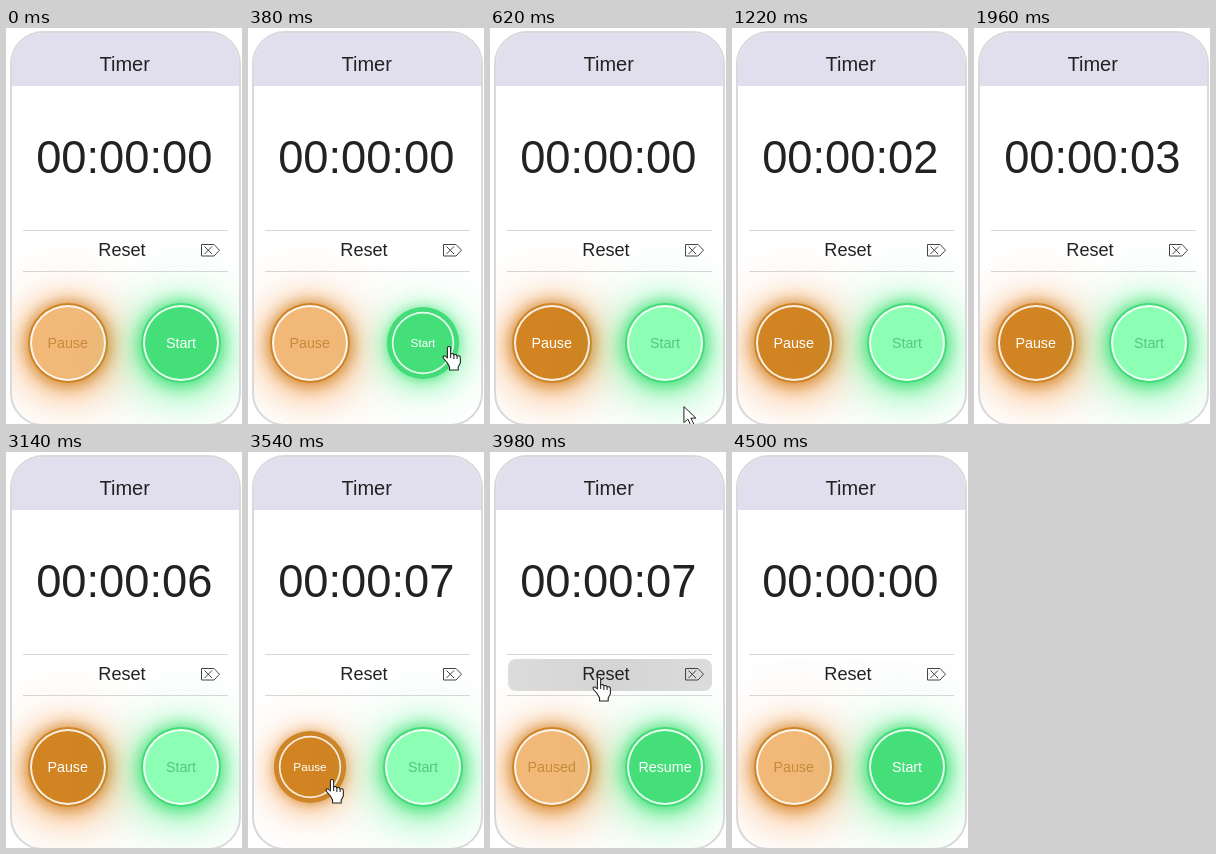
Recreate the animation shown at these times as an HTML page. Size 236 by 396 pixels, loop 4.52 s.

```html
<!DOCTYPE html>
<html lang="en">
<head>
<meta charset="utf-8">
<title>Timer</title>
<style>
  html, body { margin: 0; width: 100%; height: 100%; overflow: hidden; background: #fff; }
  body { position: relative; font-family: "Liberation Sans", Arial, sans-serif; color: #222; }
  .card, .card div, svg { position: absolute; box-sizing: border-box; }
  .card { left: 3.5px; top: 2.5px; width: 231px; height: 395px; border: 2px solid #d9d9dc; border-radius: 33px; }
  .clip { inset: 0; overflow: hidden; border-radius: 31px; }
  .stage { left: -5.5px; top: -4.5px; width: 236px; height: 400px; }
  .header { left: 0; top: 0; width: 236px; height: 58px; background: #e1deee; }
  .label { left: 0; width: 236px; text-align: center; white-space: nowrap; }
  .title { top: 24px; left: .7px; font-size: 20px; line-height: 24px; }
  .time { top: 104px; left: .3px; font-size: 45.3px; line-height: 52px; }
  .reset { top: 212px; left: -2px; font-size: 18.1px; line-height: 20px; }
  .rule { left: 17px; width: 205px; height: 1px; background: #d6d6d6; }
  .hover { left: 17.5px; top: 207px; width: 204.5px; height: 32px; border-radius: 8px;
    background: linear-gradient(90deg, #dcdcdc, #d4d4d4 50%, #dcdcdc); }
  .button { top: 277.3px; width: 76px; height: 76px; border: 2.5px solid #ffffffe0; border-radius: 50%;
    font-size: 14.3px; line-height: 72px; text-align: center; white-space: nowrap; }
  .button span { position: absolute; left: -10px; right: -10px; }
</style>
</head>
<body>
<div class="card"><div class="clip"><div class="stage">
  <div class="header"></div>
  <div class="label title">Timer</div>
  <div class="label time" id="time"></div>
  <div class="button" id="pause" style="left:23.7px"><span></span></div>
  <div class="button" id="start" style="left:137px"><span></span></div>
  <div class="hover" id="hover"></div>
  <div class="rule" style="top:202px"></div>
  <div class="rule" style="top:243px"></div>
  <div class="label reset">Reset</div>
  <svg style="left:194px;top:215px" width="22" height="15" fill="none" stroke="#444">
    <path d="M1.5 1.5H14L19.5 7.2L14 13H1.5ZM4.5 3.5L12 11M12 3.5L4.5 11"/>
  </svg>
</div></div></div>
<svg id="cursor" style="left:0;top:0" width="22" height="28" fill="#fff" stroke="#222" stroke-linejoin="round">
  <path id="arrow" d="M1 1V17L5 13.5L8 20L11 18.7L8 12.5H13Z"/>
  <path id="hand" transform="scale(1.08 1)" d="M5 17L1.5 12.5Q0 9.5 3 10L5 12V2Q5 .5 6.5 .5Q8 .5 8 2V8Q10 6.5 11 9Q13 7.5 14 10Q17 9 17 12V17L15 21V24H7V21Z M8 8V12M11 9V13M14 10V13"/>
</svg>
<script>
const LOOP = 4520;
const START_AT = 430, FIRST_TICK = 770, TICK = 450, PAUSE_AT = 3560, RESET_AT = 4200;
const $ = id => document.getElementById(id);
const clamp = x => Math.max(0, Math.min(1, x));
const ramp = (t, from, duration) => clamp((t - from) / duration);
const pulse = (t, from, to) => ramp(t, from, 70) - ramp(t, to, 90);
const mix = (a, b, p) => `color-mix(in srgb, ${b} ${p * 100}%, ${a})`;

// Cursor visits: [time, x, y] points of the pointer tip.
const visits = [
  [[80, 238, 372], [290, 199, 318], [470, 199, 318], [700, 192, 400]],
  [[3160, 98, 400], [3390, 82, 327], [3620, 82, 327], [3880, 107, 225], [4280, 107, 225]]
];

const palette = {
  pause: { on: '#d28322', off: '#f2b878', text: '#c8893b', rim: '#cf8428', glow: '#f59a45' },
  start: { on: '#44df79', off: '#8dffb5', text: '#55c684', rim: '#43dc78', glow: '#4df184' }
};

function cursorAt(t) {
  const path = visits.find(v => t >= v[0][0] && t < v.at(-1)[0]);
  if (!path) return null;
  const i = path.findIndex(p => p[0] > t);
  const a = path[i - 1], b = path[i];
  const u = ramp(t, a[0], b[0] - a[0]);
  const ease = u * u * (3 - 2 * u);
  return [1, 2].map(k => a[k] + (b[k] - a[k]) * ease);
}

function paintButton(id, label, active, press) {
  const c = palette[id], el = $(id), text = el.firstChild;
  text.textContent = label;
  text.style.color = mix(c.text, '#fff', active);
  el.style.background = mix(c.off, c.on, active);
  el.style.transform = `scale(${1 - .18 * press})`;
  el.style.boxShadow = `0 0 0 ${2 + 4 * press}px ${c.rim}, 0 1px 16px 3px ${c.rim}, ` +
    `0 5px 38px 6px ${c.glow}b0, 0 8px 70px 8px ${c.glow}50`;
}

function overTarget([x, y]) {
  const inCircle = cx => Math.hypot(x - cx, y - 315) < 39;
  return inCircle(61.5) || inCircle(174.5) || (x > 17 && x < 222 && y > 206 && y < 240);
}

function draw(t) {
  const paused = t >= PAUSE_AT && t < RESET_AT;
  const running = ramp(t, START_AT, 80) - ramp(t, PAUSE_AT, 80);
  const ticks = t < FIRST_TICK || t >= RESET_AT ? 0
    : 1 + Math.floor((Math.min(t, PAUSE_AT) - FIRST_TICK) / TICK);
  $('time').textContent = '00:00:0' + ticks;
  paintButton('pause', paused ? 'Paused' : 'Pause', running, pulse(t, 3460, 3560));
  paintButton('start', paused ? 'Resume' : 'Start', 1 - running, pulse(t, 310, 430));
  $('hover').style.opacity = ramp(t, 3820, 120) - ramp(t, 4280, 230);

  const tip = cursorAt(t), cursor = $('cursor');
  cursor.style.display = tip ? '' : 'none';
  if (!tip) return;
  const hand = overTarget(tip);
  $('hand').style.display = hand ? '' : 'none';
  $('arrow').style.display = hand ? 'none' : '';
  cursor.style.transform = `translate(${tip[0] - (hand ? 5 : 1)}px, ${tip[1]}px)`;
}

const origin = performance.now();
function frame() {
  draw((performance.now() - origin) % LOOP);
  requestAnimationFrame(frame);
}
frame();
</script>
</body>
</html>
```
